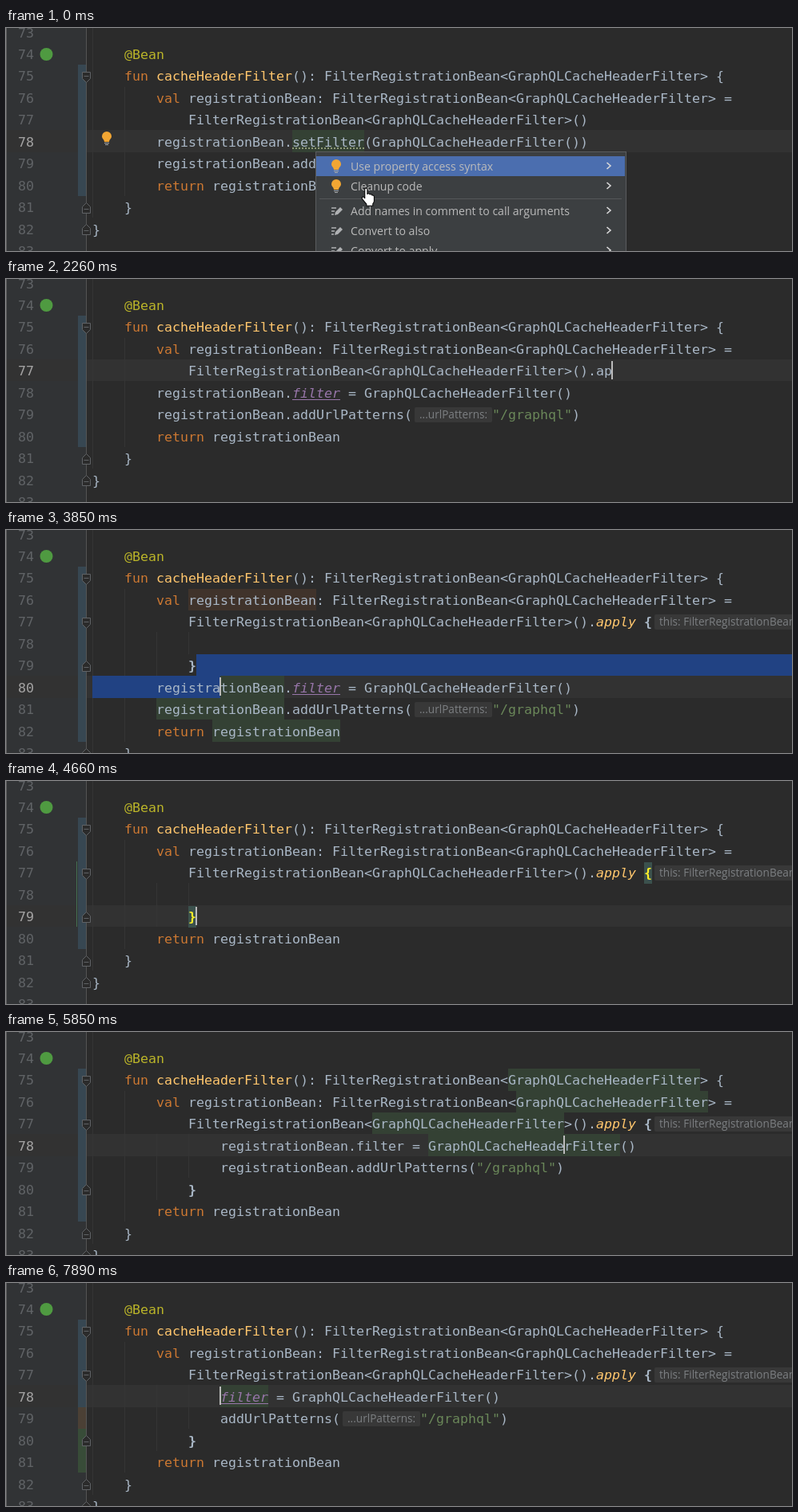
An HTML page for the animation above (8000 ms loop, 983x280 px).

```html
<!DOCTYPE html>
<html lang="en">
<head>
<meta charset="utf-8">
<title>Refactoring to apply</title>
<style>
html, body { margin: 0; width: 100%; height: 100%; overflow: hidden; background: #2b2b2b; }
#stage { position: relative; width: 983px; height: 280px; overflow: hidden; background: #2b2b2b; color: #a9b7c6; }
#stage > * { position: absolute; }
.gutter { left: 0; top: 0; width: 100px; height: 280px; background: #313335; border-left: 1px solid #616161; box-sizing: border-box; }
.rule { left: 100px; top: 0; width: 1px; height: 280px; background: #555; }
.cur { background: #323232; }
.guide { background: #353535; }
.mod { background: #374752; }
.edit { background: #4b4035; }
.new { background: #384c38; }
.edge { background: #447152; }
.id { background: #344134; }
.write { background: #40332b; }
.sel { background: #214283; }
.caret { background: #bbb; }
.code, .num { margin: 0; font: 16.61px/27px "DejaVu Sans Mono", "Noto Sans Mono", monospace; white-space: pre; }
.num { left: 15px; color: #606366; }
.num.on { color: #a4a3a3; }
.kw { color: #cc7832; }
.ann { color: #bbb529; }
.fn { color: #ffc66d; }
.str { color: #6a8759; }
.prop { color: #9876aa; }
.ext { color: #9876aa; font-style: italic; text-decoration: underline 1px; text-underline-offset: 2px; }
.call { color: #ffc66d; font-style: italic; }
.weak { text-decoration: underline dotted #8f9a76 1.5px; text-underline-offset: 1px; }
.br { font-weight: bold; }
.match { font-weight: bold; color: #ffef28; background: #3b514d; padding: 4px 0; }
.hint { display: inline-block; position: relative; width: 100px; height: 27px; vertical-align: top; }
.hint span { position: absolute; left: 3px; top: 4px; padding: 0 6px; height: 19px; border-radius: 2px;
  background: #383838; color: #7c7f82; font: 13.6px/18px "Open Sans", "Noto Sans", sans-serif; }
.menu { left: 387px; top: 155px; width: 387px; height: 140px; background: #3c3f41; border: 1px solid #5a5c5e; }
.menu div { position: absolute; left: 0; width: 386px; height: 25px; padding-left: 43px; box-sizing: border-box;
  font: 14.1px/25px "Open Sans", "Noto Sans", sans-serif; color: #bbb; white-space: pre; }
.menu .hot { background: #4b6eaf; }
.menu hr { position: absolute; left: 4px; top: 58px; width: 378px; height: 1px; margin: 0; border: 0; background: #555759; }
.popup { left: 703px; top: 129px; width: 300px; height: 53px; background: #46484a; border: 1px solid #616365; white-space: pre; }
.popup div { height: 27px; padding-left: 34px; background: #113a5c; font: 16.61px/27px "DejaVu Sans Mono", monospace; }
.popup p { margin: 0; padding-left: 8px; font: 13px/25px "Open Sans", sans-serif; color: #8c8c8c; }
svg { left: 0; top: 0; }
</style>
</head>
<body>
<div id="stage"></div>
<script>
const LOOP = 8000, FIRST = 73, LAST = 83;
const stage = document.getElementById('stage');
const rowY = row => 101 + (row - 77) * 27.45;

// Document lines: a part is plain text or [class, text]
const line = (col, ...parts) => ({ col, parts });
const BEAN = 'FilterRegistrationBean<GraphQLCacheHeaderFilter>';
const REG = 'registrationBean.';
const HINT = ['hint', '...urlPatterns:'];
const head = [
  line(0),
  line(4, ['ann', '@Bean']),
  line(4, ['kw', 'fun'], ' ', ['fn', 'cacheHeaderFilter'], `(): ${BEAN} {`),
  line(8, ['kw', 'val'], ` registrationBean: ${BEAN} =`)
];
const tail = [line(8, ['kw', 'return'], ' registrationBean'), line(4, '}'), line(0, '}')];
const ctor = (...more) => line(12, BEAN + '()', ...more);
const assign = (col, pre, cls) => line(col, pre, [cls, 'filter'], ' = GraphQLCacheHeaderFilter()');
const add = (col, pre, hint = '') => line(col, pre + 'addUrlPatterns(', hint, ['str', '"/graphql"'], ')');
const open = brace => ctor('.', ['call', 'apply'], ' ', [brace, '{'], ['hint', 'this: FilterRegistrationBean<GraphQLCacheHeaderFilter>']);
const close = brace => line(12, [brace, '}']);

const flat = (first, cls) => [first, assign(8, REG, cls), add(8, REG, HINT), ...tail];
const split = (first, brace) => [first, line(0), close(brace), ...flat(first, 'ext').slice(1)];
const cut = brace => [open(brace), line(0), close(brace), ...tail];
const moved = (a, b) => [open('br'), a, b, close('br'), ...tail];
const typed = text => ({ rows: flat(ctor('.' + text), 'ext'), caret: 738 + text.length * 10 });
const plainOpen = brace => ctor('.apply ', [brace, '{']);

const uses = [['write', 76, 228, 160], ['id', 80, 188, 160], ['id', 81, 188, 160], ['id', 82, 258, 160]];
const short = cls => assign(16, '', cls);

// Each step changes only the listed fields
const steps = [
  [0, { rows: [ctor(), line(8, REG, ['weak', 'setFilter'], '(GraphQLCacheHeaderFilter())'), add(8, REG, HINT), ...tail],
        cur: 78, caret: 0, marks: [['id', 78, 358, 90]], over: 'menu', folds: false, bars: null, edge: false }],
  [120, { rows: flat(ctor(), ''), caret: 358, marks: [], over: 'beam' }],
  [640, { rows: flat(ctor(), 'prop') }],
  [780, { rows: flat(ctor(), 'ext') }],
  [1030, { cur: 77, marks: [['id', 77, 228, 220]] }],
  [1430, { caret: 728, marks: [] }],
  [1990, { ...typed(''), over: '' }],
  [2140, typed('a')],
  [2260, typed('ap')],
  [2380, typed('app')],
  [2500, { ...typed('appl'), over: 'popup' }],
  [2620, typed('apply')],
  [2900, { rows: flat(ctor('.apply ', ['match', '{'], '  ', ['match', '}']), 'ext'), caret: 818, over: '' }],
  [3020, { rows: split(plainOpen('br'), 'br'), cur: 78, caret: 268 }],
  [3300, { cur: 79, caret: 238 }],
  [3420, { rows: split(plainOpen('match'), 'match') }],
  [3850, { rows: split(open('br'), 'br'), folds: true, cur: 80, caret: 268,
           marks: [...uses, ['sel', 79, 238, 745], ['sel', 80, 108, 160]] }],
  [4120, { cur: 81, marks: [...uses, ['sel', 79, 238, 745], ['sel', 80, 108, 875], ['sel', 81, 108, 160]] }],
  [4270, { caret: 718, marks: [...uses, ['sel', 79, 238, 745], ['sel', 80, 108, 875], ['sel', 81, 108, 610]] }],
  [4660, { rows: cut('match'), cur: 79, caret: 238, marks: [], edge: true }],
  [4790, { rows: cut('br'), cur: 78 }],
  [4910, { cur: 77 }],
  [5050, { caret: 0 }],
  [5450, { rows: moved(assign(16, REG, ''), add(16, REG)), cur: 79, caret: 698, edge: false }],
  [5850, { cur: 78, marks: [[75, 628], [76, 638], [77, 458], [78, 528]].map(([r, x]) => ['id', r, x, 240]) }],
  [6110, { caret: 268, marks: [] }],
  [6690, { caret: 428, marks: [['sel', 78, 268, 160]] }],
  [6950, { rows: moved(short(''), add(16, REG)), caret: 268, marks: [] }],
  [7080, { rows: moved(short(''), add(16, '')), cur: 79 }],
  [7360, { rows: moved(short(''), add(16, '', HINT)), bars: [['mod', 75, 78], ['edit', 79, 79], ['new', 80, 81]] }],
  [7480, { rows: moved(short('prop'), add(16, '', HINT)) }],
  [7630, { rows: moved(short('ext'), add(16, '', HINT)) }],
  [7770, { cur: 78 }],
  [7890, { marks: [['id', 78, 268, 60]] }]
];
let last = {};
const states = steps.map(([t, change]) => (last = { ...last, ...change, t }));

// Drawing helpers
const esc = s => s.replace(/</g, '&lt;');
const box = (cls, x, y, w, h) => `<div class="${cls}" style="left:${x}px;top:${y}px;width:${w}px;height:${h}px"></div>`;
const band = (cls, from, to, x, w) => {
  const y = Math.round(rowY(from));
  return box(cls, x, y, w, Math.round(rowY(to + 1)) - y);
};
const part = p => typeof p === 'string' ? esc(p)
  : p[0] === 'hint' ? `<span class="hint"><span>${esc(p[1])}</span></span>`
  : `<span class="${p[0]}">${esc(p[1])}</span>`;
const textTop = row => Math.round(rowY(row) + 1.3);
const svg = body => `<svg width="983" height="280">${body}</svg>`;
const fold = (row, dir) => `<g transform="translate(100.5 ${Math.round(rowY(row) + 15 + dir) + .5}) scale(1 ${dir})" fill="#2b2b2b" stroke="#606366">
  <path d="M-5-7H5V1L0 6L-5 1Z"/><path d="M-3-2H3"/></g>`;
const bulb = (x, y) => `<g transform="translate(${x} ${y})"><path d="M-3 5C-3 2-6 1-6-2A6 6 0 0 1 6-2C6 1 3 2 3 5Z" fill="#f2a633"/>
  <path d="M-3 6.5H3M-2 8.5H2" stroke="#a9acae" stroke-width="1.2"/></g>`;
const pencil = y => `<path d="M407 ${y - 4}h6M407 ${y}h4M407 ${y + 4}h3" stroke="#afb1b3" stroke-width="1.3"/>
  <path d="M411 ${y + 5}l1-4 6-6 3 3-6 6Z" fill="#afb1b3"/>`;
const chevron = y => `<path d="M751.5 ${y - 4}l4.5 4-4.5 4" fill="none" stroke="#d8d8d8" stroke-width="1.6"/>`;

const items = [['Use property access syntax', 174], ['Cleanup code', 199],
  ['Add names in comment to call arguments', 230], ['Convert to also', 255], ['Convert to apply', 280]];
const hand = `<path transform="translate(444.5 200) scale(1.06)" fill="#fff" stroke="#000" stroke-linejoin="round"
  d="M4 13V2.5Q4 1 5.5 1T7 2.5V8Q9 6.5 10 8.5Q12 7.5 12.5 9.5Q15 9 15 11.5V16Q15 18 13.5 19.5V22H6V20L1 14Q0 12 1.5 11.5T4 13Z"/>`;
const overlays = {
  '': () => '',
  beam: () => svg('<path d="M448 195.5h2.5l1 1 1-1H455M451.5 196v13M448 209.5h2.5l1-1 1 1H455" fill="none" stroke="#d0d0d0"/>'),
  popup: () => '<div class="popup"><div>apply {...} (block: T.() -> Unit)</div><p>Press Enter to insert, Tab to replace</p></div>',
  menu: () => `<div class="menu">${items.map(([s, y], i) =>
      `<div${i ? '' : ' class="hot"'} style="top:${y - 169}px">${s}</div>`).join('')}<hr></div>` +
    svg(bulb(126, 138) + bulb(413, 173) + bulb(413, 198) + items.map(([, y], i) =>
      (i > 1 ? pencil(y) : '') + chevron(y - 1)).join('') + hand)
};

function draw(s) {
  const lines = [...head, ...s.rows];
  const end = FIRST + lines.length - 1;
  const inner = s.rows.findIndex(l => l.col === 12 && l.parts.length === 1 && l.parts[0][1] === '}');
  const shut = inner > 0 ? 77 + inner : 0;
  const guide = (x, from, to) => band('guide', from, to, x, 1);
  const bars = s.bars || [['mod', 75, end - 2]];

  let html = '<div class="gutter"></div>' + band('cur', s.cur, s.cur, 1, 982);
  html += bars.map(([c, a, b]) => band(c, a, b, 90, 10)).join('');
  if (s.edge) html += band('edge', 77, 79, 88, 1);
  html += '<div class="rule"></div>' + guide(108, FIRST, end - 1) + guide(148, 76, end - 2);
  if (shut) html += guide(188, 78, shut) + guide(228, 78, shut - 1);
  html += s.marks.map(([c, r, x, w]) => band(c, r, r, x, w)).join('');

  for (let row = FIRST; row <= LAST; row++) {
    const top = textTop(row), l = lines[row - FIRST];
    html += `<div class="num${row === s.cur ? ' on' : ''}" style="top:${top}px">${row}</div>`;
    if (l) html += `<pre class="code" style="left:${108 + l.col * 10}px;top:${top}px">${l.parts.map(part).join('')}</pre>`;
  }

  let folds = fold(75, 1) + fold(end - 1, -1) + fold(end, -1);
  if (s.folds) folds += fold(77, 1) + fold(shut, -1);
  html += svg(folds + '<circle cx="50.5" cy="33" r="8" fill="#4f9a41"/>');
  if (s.caret) html += box('caret', s.caret - 1, Math.round(rowY(s.cur)) + 2, 2, 23);
  stage.innerHTML = html + overlays[s.over]();
}

const start = performance.now();
let shown = null;
function tick() {
  const t = (performance.now() - start) % LOOP;
  const state = states.findLast(s => s.t <= t) || states[0];
  if (state !== shown) draw(shown = state);
  requestAnimationFrame(tick);
}
tick();
</script>
</body>
</html>
```
